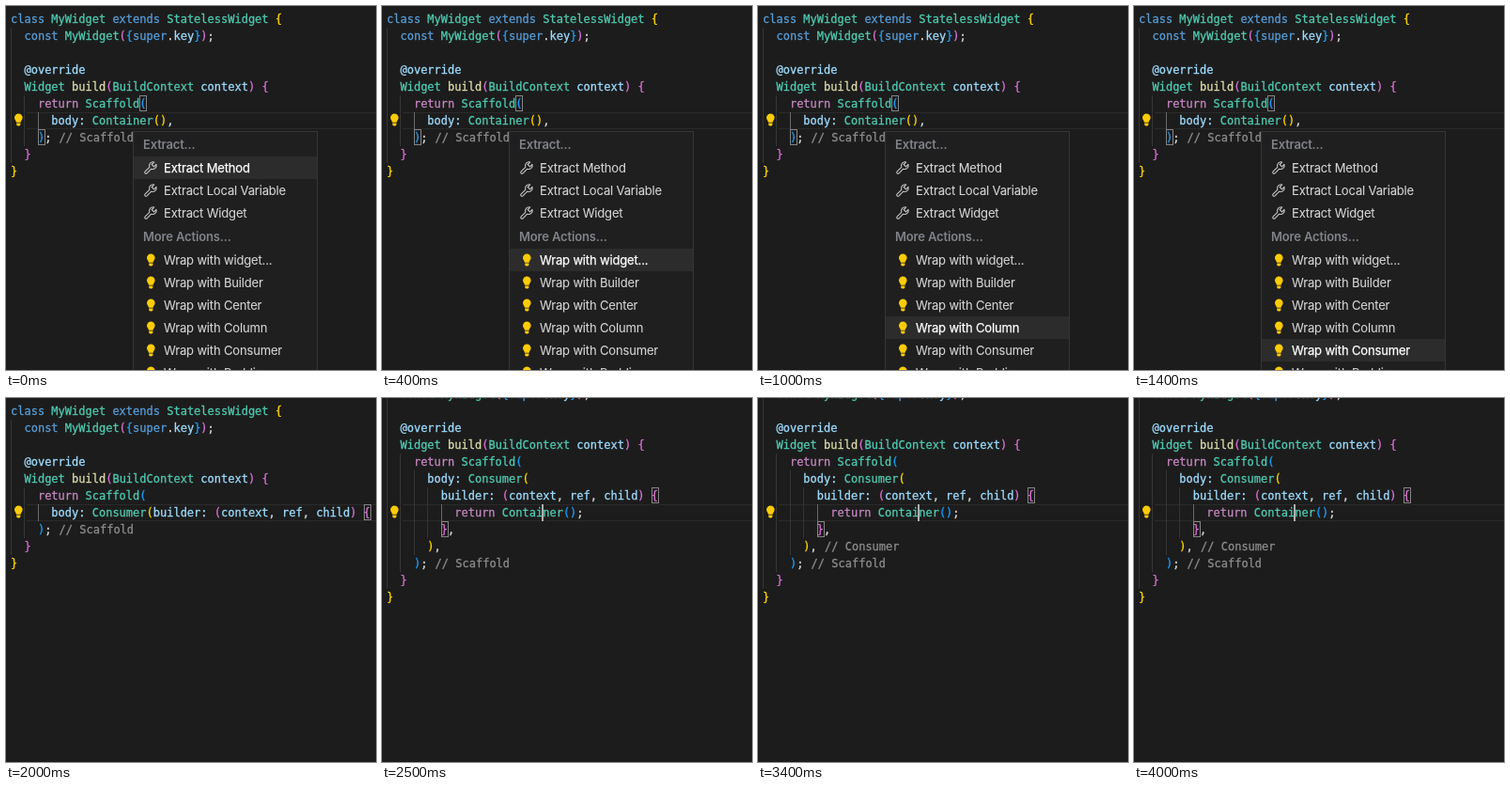
These frames come from a looping animation (394x387 px, 4100 ms). An HTML page:

```html
<!DOCTYPE html>
<html lang="en">
<head>
<meta charset="utf-8">
<title>Wrap a widget</title>
<style>
@property --sel { syntax: "<integer>"; inherits: true; initial-value: 0; }

html, body { margin: 0; width: 100%; height: 100%; overflow: hidden; background: #1c1c1c; }
#stage { position: relative; width: 394px; height: 387px; overflow: hidden; }
#stage div, pre, svg { position: absolute; }

.scene, .menu, .late { animation: 4100ms step-end infinite; }
.scene { inset: 0; visibility: hidden; }
#before { animation-name: before; }
#inserted { animation-name: inserted; }
#formatted { animation-name: formatted; }
.late { animation-name: late; }
@keyframes before { 0% { visibility: visible } 36.58%, 100% { visibility: hidden } }
@keyframes inserted { 0% { visibility: hidden } 36.58% { visibility: visible } 58.53%, 100% { visibility: hidden } }
@keyframes formatted { 0% { visibility: hidden } 58.53%, 100% { visibility: visible } }
@keyframes late { 0% { opacity: 0 } 82.92%, 100% { opacity: 1 } }

pre { margin: 0; left: 5px; top: 5px; color: #d4d4d4;
  font: 12px/18px "DejaVu Sans Mono", monospace; -webkit-text-stroke: .3px; }
.page { inset: 0; }
#formatted .page { top: -36px; }
.key { color: #569cd6 } .flow { color: #c586c0 } .type { color: #4ec9b0 }
.fn { color: #dcdcaa } .name { color: #9cdcfe } .note { color: #8c8c8c; margin-left: 1px }
.b0 { color: #ffd700 } .b1 { color: #da70d6 } .b2 { color: #179fff }

.guide { width: 1px; background: #363636; }
.guide.active { background: #6a6a6a; }
.match { box-sizing: border-box; width: 8px; height: 17px; border: 1px solid #858585; }
.line { left: 22px; right: 0; top: 113px; height: 16px; border: solid #2a2a2a; border-width: 1px 0; }
.caret { left: 170px; top: 113px; width: 2px; height: 18px; background: #aeafad; }

.menu { left: 135px; top: 133px; width: 195px; height: 300px; background: #1f1f1f;
  border: 1px solid #363636; font: 13px/24px Inter, sans-serif; letter-spacing: -.16px;
  white-space: nowrap; animation-name: pick; }
.head { left: 10px; color: #80838a; font-weight: 600; }
.row { --on: calc(1 - min(1, max(var(--sel) - var(--i), var(--i) - var(--sel))));
  left: 0; right: 0; height: 24px; padding-left: 32px;
  -webkit-text-stroke: calc(.1px + var(--on) * .15px);
  color: rgb(255 255 255 / calc(.8 + .2 * var(--on)));
  background: rgb(255 255 255 / calc(.06 * var(--on))); }
.row svg { left: 10px; top: 4px; }
@keyframes pick {
  0% { --sel: 0 } 2.43% { --sel: 1 } 4.87% { --sel: 2 } 7.31% { --sel: 3 }
  12.19% { --sel: 4 } 17.07% { --sel: 5 } 19.51% { --sel: 6 } 29.26%, 100% { --sel: 7 }
}
</style>
</head>
<body>
<div id="stage">
  <div class="line"></div>
  <div class="scene" id="before"></div>
  <div class="scene" id="inserted"></div>
  <div class="scene" id="formatted"></div>
</div>
<script>
const CHAR = 7.224, LINE = 18, PAD = 5;
const $ = id => document.getElementById(id);
const div = (cls, style, html = '') => `<div class="${cls}" style="${style}">${html}</div>`;

const words = {
  key: /^(class|extends|const|super)$/,
  flow: /^return$/,
  type: /^[A-Z]\w*$/,
  fn: /^build$/,
  name: /^@?\w+:?$/
};

// Colours words by kind and brackets by depth; the indent gives each line's starting depth.
function paint(line) {
  let depth = line.search(/\S|$/) / 2 + /^\s*[)}]/.test(line);
  return line.replace(/\/\/.*|@?\w+:?|[(){}]/g, token => {
    let cls;
    if (token.startsWith('//')) cls = token.endsWith('Consumer') ? 'note late' : 'note';
    else if ('({'.includes(token)) cls = 'b' + depth++ % 3;
    else if (')}'.includes(token)) cls = 'b' + --depth % 3;
    else cls = Object.keys(words).find(kind => words[kind].test(token));
    return `<span class="${cls}">${token}</span>`;
  });
}

const source = body => `class MyWidget extends StatelessWidget {
  const MyWidget({super.key});

  @override
  Widget build(BuildContext context) {
    return Scaffold(
${body}
    ); // Scaffold
  }
}`;

// guides: [column, first line, last line], the last one active; matches: [column, line]
function scene(id, body, guides, matches) {
  const place = (col, line) => `left:${Math.round(PAD + col * CHAR)}px;top:${PAD + line * LINE}px`;
  const rails = guides.map(([col, from, to], i) =>
    div(i === guides.length - 1 ? 'guide active' : 'guide',
      `${place(col, from)};height:${(to - from + 1) * LINE}px`));
  const boxes = matches.map(([col, line]) => div('match', place(col, line)));
  const code = source(body).split('\n').map(paint).join('\n');
  $(id).innerHTML = div('page', '', rails.join('') + `<pre>${code}</pre>` + boxes.join(''));
}

const shortGuides = [[0, 1, 8], [2, 5, 7], [4, 6, 6]];
scene('before', '      body: Container(),', shortGuides, [[19, 5], [4, 7]]);
scene('inserted', '      body: Consumer(builder: (context, ref, child) {', shortGuides, [[52, 6]]);
scene('formatted', `      body: Consumer(
        builder: (context, ref, child) {
          return Container();
        },
      ), // Consumer`,
  [[0, 1, 12], [2, 5, 11], [4, 6, 10], [6, 7, 9], [8, 8, 8]], [[39, 7], [8, 9]]);
$('formatted').innerHTML += div('caret', '');

const bulbShape = `<path fill="#fc0" d="M8.3 1.4a4.3 4.3 0 0 0-4.3 4.3C4 7.8 5.8 8.8 6 10.8h4.6C10.8 8.8 12.6 7.8 12.6 5.7A4.3 4.3 0 0 0 8.3 1.4z
  M6.2 11.4h4.2v1.6q0 1.4-1.4 1.4H7.6q-1.4 0-1.4-1.4z"/>`;
const wrenchShape = `<path fill="none" stroke="#c5c5c5" stroke-width="1.1" stroke-linejoin="round"
  d="M14 4.3 11.5 6.8 9.2 4.5 11.7 2A4 4 0 0 0 6.8 7.3L1.9 12.2A1.4 1.4 0 0 0 3.8 14.1L8.7 9.2A4 4 0 0 0 14 4.3z"/>`;
const icon = (shape, style = '') => `<svg width="16" height="16" viewBox="0 0 16 16" style="${style}">${shape}</svg>`;

const labels = ['Extract Method', 'Extract Local Variable', 'Extract Widget', 'Wrap with widget...',
  'Wrap with Builder', 'Wrap with Center', 'Wrap with Column', 'Wrap with Consumer', 'Wrap with Padding'];
const rows = labels.map((label, i) => {
  const top = 26 + i * 24 + (i > 2 ? 26 : 0);
  return div('row', `--i:${i};top:${top}px`, icon(i < 3 ? wrenchShape : bulbShape) + label);
});
$('before').innerHTML += div('menu', '',
  div('head', 'top:1px', 'Extract...') + div('head', 'top:99px', 'More Actions...') + rows.join(''));
$('stage').insertAdjacentHTML('beforeend', icon(bulbShape, 'left:5px;top:113px'));
</script>
</body>
</html>
```
